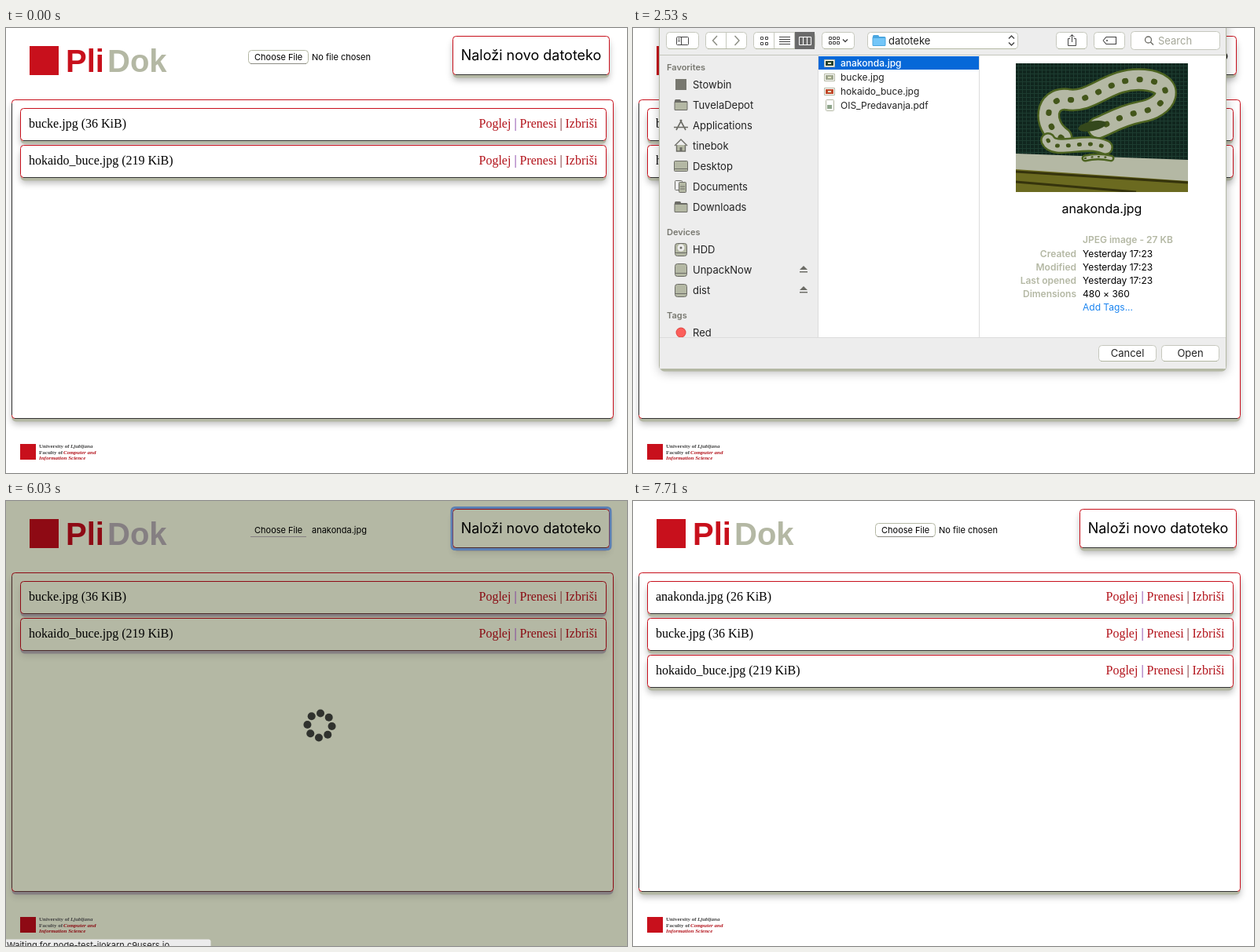
Animation, 790 px wide and 567 px high, one loop 8000 ms. Source, as an HTML page with a canvas:

```html
<!DOCTYPE html>
<html lang="sl">
<head>
<meta charset="utf-8">
<title>PliDok</title>
<style>
html, body { margin: 0; width: 100%; height: 100%; overflow: hidden; background: #fff; }
canvas { display: block; width: 790px; height: 567px; }
</style>
</head>
<body>
<canvas id="stage" width="790" height="567"></canvas>
<script>
const ctx = document.getElementById('stage').getContext('2d');
const LOOP = 8000, TICK = 70, SHEET_TRAVEL = 443;
const UI = 'Inter, sans-serif', SERIF = '"Liberation Serif", serif';
const SAGE = '#b4b8a4', INK = '#222';
const LIGHT = { bg: '#fff', red: '#c8101c', link: '#b3141c', soft: SAGE, edge: '#333', glow: 'rgba(0,0,0,.28)' };
const DIM = { bg: SAGE, red: '#8e0a14', link: '#8a0d14', soft: '#857f82', edge: '#4a2a2a', glow: 'rgba(0,0,0,.12)' };

const ease = p => p * p * (3 - 2 * p);

function text(s, x, y, size, color, { family = UI, style = '400', align = 'left' } = {}) {
  ctx.font = `${style} ${size}px ${family}`;
  ctx.fillStyle = color;
  ctx.textAlign = align;
  ctx.fillText(s, x, y);
}

function box(x, y, w, h, r, fill, stroke) {
  ctx.beginPath();
  ctx.roundRect(x + .5, y + .5, w - 1, h - 1, r);
  if (fill) { ctx.fillStyle = fill; ctx.fill(); }
  if (stroke) { ctx.strokeStyle = stroke; ctx.lineWidth = 1; ctx.stroke(); }
}

function rect(x, y, w, h, color) {
  ctx.fillStyle = color;
  ctx.fillRect(x, y, w, h);
}

function lines(color, width, ...paths) {
  ctx.strokeStyle = color;
  ctx.lineWidth = width;
  ctx.beginPath();
  for (const [x, y, ...rest] of paths) {
    ctx.moveTo(x, y);
    for (let i = 0; i < rest.length; i += 2) ctx.lineTo(rest[i], rest[i + 1]);
  }
  ctx.stroke();
}

function disc(x, y, r, fill) {
  ctx.beginPath();
  ctx.arc(x, y, r, 0, 7);
  ctx.fillStyle = fill;
  ctx.fill();
}

function clipped(x, y, w, h, draw) {
  ctx.save();
  ctx.beginPath();
  ctx.rect(x, y, w, h);
  ctx.clip();
  draw();
  ctx.restore();
}

// ---------- Web page ----------

function card(x, y, w, h, c) {
  ctx.save();
  ctx.shadowColor = c.glow;
  ctx.shadowBlur = 8;
  ctx.shadowOffsetY = 3;
  box(x, y + 4, w, h, 5, c.soft);
  ctx.restore();
  box(x, y, w, h, 4, c.bg, c.red);
  lines(c.edge, 1, [x + 4, y + h - .5, x + w - 4, y + h - .5]);
}

function fileCard(y, label, c) {
  card(18, y, 746, 42, c);
  const serif = { family: SERIF };
  text(label, 29, y + 25, 16, '#000', serif);
  text('Poglej', 601.5, y + 25, 16, c.link, serif);
  text('|', 646.5, y + 25, 16, '#7a2a9c', serif);
  text('Prenesi', 653.5, y + 25, 16, c.link, serif);
  text('|', 704.5, y + 25, 16, '#6a1016', serif);
  text('Izbriši', 711.5, y + 25, 16, c.link, serif);
}

function fileInput(label, pressed, dim) {
  if (dim) {
    lines('#857f82', 1, [311, 45.5, 382, 45.5]);
  } else {
    box(308, 28, 77, 18, 4, pressed ? '#d9d9d9' : '#fff', SAGE);
    lines('#8c8c84', 1, [311, 45.5, 382, 45.5]);
  }
  text('Choose File', 316, 41, 11, '#000');
  text(label, 389, 41, 11, '#000');
}

function footer(c) {
  rect(18, 530, 20, 20, c.red);
  const small = (s, x, y, color, style) => text(s, x, y, 7, color, { family: SERIF, style });
  small('University of', 42, 535, '#444', 'bold');
  small('Ljubljana', 82, 535, '#444', 'italic bold');
  small('Faculty of', 42, 542.5, '#444', 'bold');
  small('Computer and', 73, 542.5, c.link, 'italic bold');
  small('Information Science', 42, 549.5, c.link, 'italic bold');
}

function page(t) {
  const dim = t >= 6030 && t < 7500;
  const done = t >= 7500;
  const c = dim ? DIM : LIGHT;
  rect(0, 0, 790, 567, c.bg);

  rect(30, 23, 37, 37, c.red);
  const brand = { family: '"Liberation Sans", sans-serif', style: 'bold' };
  text('Pli', 76, 56, 40, c.red, brand);
  text('Dok', 129, 56, 40, c.soft, brand);

  fileInput(t >= 4770 && !done ? 'anakonda.jpg' : 'No file chosen', t >= 500 && t < 1200, dim);

  card(568, 10, 200, 50, c);
  if (t >= 5960 && !done) {
    ctx.beginPath();
    ctx.roundRect(567, 8.5, 202, 53, 4);
    ctx.strokeStyle = '#5b7fb4';
    ctx.lineWidth = 3;
    ctx.stroke();
  }
  text('Naloži novo datoteko', 668, 41, 18, '#000', { align: 'center' });

  card(7, 91, 766, 407, c);
  lines(c.edge, 1, [7.5, 96, 7.5, 493]);
  const files = ['bucke.jpg (36 KiB)', 'hokaido_buce.jpg (219 KiB)'];
  if (done) files.unshift('anakonda.jpg (26 KiB)');
  files.forEach((f, i) => fileCard(102 + 47 * i, f, c));
  footer(c);

  if (dim) spinner(t);
  if (t >= 6030 && t < 7710) {
    ctx.globalAlpha = t >= 7640 ? .5 : 1;
    box(-5, 558, 266, 20, 3, '#ececec');
    text('Waiting for node-test-jlokarn.c9users.io...', 1, 570, 11, INK);
    ctx.globalAlpha = 1;
  }
}

function spinner(t) {
  const turn = Math.floor((t - 7010) / TICK) * TICK / 1000 * 2 * Math.PI - .06;
  for (let i = 0; i < 8; i++) {
    const a = turn + (i - 2) * Math.PI / 4;
    disc(399 + 15.6 * Math.cos(a), 286 + 15.6 * Math.sin(a), 5, '#30322e');
  }
}

// ---------- File dialog ----------

const LINE = '#6c6c66';

function folder(x, y, fill, edge) {
  ctx.beginPath();
  ctx.roundRect(x - 8, y - 7, 8, 5, 1.5);
  ctx.roundRect(x - 8.5, y - 5, 17, 12, 1.5);
  ctx.fillStyle = edge;
  ctx.fill();
  rect(x - 7.5, y - 3, 15, 9, fill);
}

const icons = {
  folder: (x, y) => folder(x, y, SAGE, LINE),
  badge: (x, y) => rect(x - 7, y - 7, 14, 14, '#77776f'),
  apps: (x, y) => lines(LINE, 1.6, [x - 6, y + 6, x + 1, y - 7], [x - 1, y - 7, x + 6, y + 6],
    [x - 9, y + 2.5, x + 9, y + 2.5]),
  home(x, y) {
    rect(x - 5.5, y - 1, 11, 8, SAGE);
    lines(LINE, 1.4, [x - 8, y, x, y - 8, x + 8, y], [x - 5.5, y - 1, x - 5.5, y + 7, x + 5.5, y + 7, x + 5.5, y - 1]);
    rect(x - 1.5, y + 2, 3, 5, LINE);
  },
  desktop(x, y) {
    box(x - 9, y - 7, 18, 14, 1, SAGE, LINE);
    rect(x - 8, y + 3, 16, 1, LINE);
  },
  docs(x, y) {
    box(x - 8, y - 8, 10, 13, 1, '#eee', LINE);
    box(x - 3, y - 6, 10, 14, 1, SAGE, LINE);
    lines(LINE, 1, [x - 1, y, x + 5, y], [x - 1, y + 3, x + 5, y + 3]);
  },
  drive(x, y) {
    box(x - 8, y - 8, 16, 17, 3, SAGE, LINE);
    lines(LINE, 1, [x - 8, y + 4.5, x + 8, y + 4.5]);
  },
  disk(x, y) {
    icons.drive(x, y);
    disc(x, y - 2, 4.5, '#eee');
    disc(x, y - 2, 1.5, LINE);
  },
  tag: (x, y) => { disc(x, y, 6.5, '#e04a46'); disc(x, y, 5.5, '#fc5f5b'); },
  note(x, y) {
    lines(LINE, 1.5, [x - 3, y + 5, x - 3, y - 6, x + 5, y - 7, x + 5, y + 4]);
    disc(x - 5, y + 5, 2.5, LINE);
    disc(x + 3, y + 4, 2.5, LINE);
  },
  camera(x, y) {
    box(x - 9, y - 5, 18, 12, 2, SAGE, LINE);
    rect(x - 4, y - 7, 8, 3, LINE);
    disc(x, y + 1, 4.5, LINE);
    disc(x, y + 1, 3, '#ddd');
    disc(x, y + 1, 1.5, LINE);
  },
  film(x, y) {
    box(x - 8, y - 8, 16, 17, 1, '#ddd', LINE);
    lines(LINE, 1, [x - 4.5, y - 8, x - 4.5, y + 8], [x + 4.5, y - 8, x + 4.5, y + 8], [x - 4, y + .5, x + 4, y + .5]);
    for (let i = -6; i < 8; i += 4) { rect(x - 7, y + i, 2, 2, LINE); rect(x + 5, y + i, 2, 2, LINE); }
  },
};

function place(icon, label, y) {
  icons[icon](61, y);
  text(label, 76, y + 4.5, 13, INK);
}

function placeGroup(title, y, items) {
  text(title, 43, y + 4, 11, '#77776f', { style: '600' });
  items.forEach(([icon, label], i) => place(icon, label, y + 22 + 26 * i));
}

function sidebar(t) {
  if (t < 1410) {
    [['note', 'Music'], ['camera', 'Photos'], ['film', 'Movies']].forEach(([icon, label], i) => place(icon, label, 34 + 26 * i));
    return;
  }
  placeGroup('Favorites', 50, [
    [t < 1760 ? 'folder' : 'badge', 'Stowbin'], ['folder', 'TuvelaDepot'], ['apps', 'Applications'],
    ['home', 'tinebok'], ['desktop', 'Desktop'], ['docs', 'Documents'], ['folder', 'Downloads']]);
  placeGroup('Devices', 260, [['disk', 'HDD'], ['drive', 'UnpackNow'], ['drive', 'dist']]);
  placeGroup('Tags', 366, [['tag', 'Red']]);
  for (const y of [308, 334]) {
    ctx.beginPath();
    ctx.moveTo(212, y);
    ctx.lineTo(217, y - 5);
    ctx.lineTo(222, y);
    ctx.fillStyle = LINE;
    ctx.fill();
    rect(212, y + 2, 10, 1.5, LINE);
  }
}

function toolbar(active, picked) {
  const ink = active ? '#444' : '#a4a698', pale = '#a4a698', edge = active ? '#c6c8be' : '#dcdcd8';
  const fill = active ? '#fff' : '#f8f8f8';
  const button = (x, w) => {
    box(x, 5, w, 22, 4, fill, edge);
    if (active) lines(SAGE, 1, [x + 3, 26.5, x + w - 3, 26.5]);
  };
  const grid = (x, y, n, size, step) => {
    for (let r = 0; r < 2; r++)
      for (let i = 0; i < n; i++) box(x + i * step, y + r * (step + 1), size, size, 0, null, ink);
  };

  button(42, 42);
  box(55, 11, 16, 11, 1, null, ink);
  lines(ink, 1, [61.5, 11, 61.5, 21], [57, 14, 60, 14], [57, 16.5, 60, 16.5]);

  button(92, 53);
  lines(edge, 1, [118.5, 6, 118.5, 26]);
  lines(active ? '#8a8c82' : pale, 1.4, [107, 10, 101.5, 16, 107, 22]);
  lines(active ? '#8a8c82' : pale, 1.4, [129.5, 10, 135, 16, 129.5, 22]);

  button(153, 79);
  rect(206, 5, 25, 22, active ? '#6a6a6a' : '#dfe0dc');
  lines(edge, 1, [179.5, 6, 179.5, 26], [205.5, 6, 205.5, 26]);
  grid(162, 11, 2, 4, 6);
  lines(ink, 1, ...[11.5, 14.5, 17.5, 20.5].map(y => [186, y, 200, y]));
  const seg = active ? '#fff' : pale;
  box(211, 11, 16, 11, 0, null, seg);
  lines(seg, 1, [216.5, 11, 216.5, 21], [221.5, 11, 221.5, 21]);

  button(240, 42);
  grid(249, 11, 3, 4, 5);
  lines(ink, 1.4, [267, 14.5, 270, 17.5, 273, 14.5]);

  button(298, 192);
  folder(313, 16, '#74c6f8', '#4aa6e0');
  text('datoteke', 325, 21, 13, active ? INK : '#8e9084');
  lines(ink, 1.4, [478, 13.5, 481.5, 10, 485, 13.5], [478, 18.5, 481.5, 22, 485, 18.5]);

  const act = picked ? ink : pale;
  button(538, 40);
  lines(act, 1, [556, 13.5, 553.5, 13.5, 553.5, 22.5, 563.5, 22.5, 563.5, 13.5, 561, 13.5],
    [558.5, 18, 558.5, 8.5], [555.5, 11.5, 558.5, 8.5, 561.5, 11.5]);
  button(586, 40);
  lines(act, 1.1, [598, 16, 602, 11.5, 614.5, 11.5, 614.5, 20.5, 602, 20.5, 598, 16]);
  disc(603, 16, 1, act);

  box(633, 4, 114, 24, 4, fill, edge);
  ctx.beginPath();
  ctx.arc(655.5, 15, 4, 0, 7);
  ctx.strokeStyle = active ? LINE : pale;
  ctx.lineWidth = 1.3;
  ctx.stroke();
  lines(active ? LINE : pale, 1.4, [658.5, 18, 662, 21.5]);
  text('Search', 668, 21, 13, pale);
}

function fileList(t) {
  const selected = t >= 2390;
  if (selected) rect(236, 36, 204, 17, '#0668d8');
  const files = [['anakonda.jpg', '#23402c'], ['bucke.jpg', '#9fa68e'], ['hokaido_buce.jpg', '#c0492a'], ['OIS_Predavanja.pdf', '#8fa68c']];
  files.forEach(([name, tone], i) => {
    const y = 45 + 18 * i, white = selected && i === 0;
    if (i < 3) {
      box(243, y - 5, 14, 10, 0, '#fff', SAGE);
      rect(245, y - 3, 10, 6, tone);
      rect(248, y - 1, 4, 2, '#e3e6c8');
    } else {
      box(245, y - 8, 11, 15, 1, '#fff', SAGE);
      rect(247, y - 1, 6, 5, tone);
    }
    text(name, 264, y + 4, 12, white ? '#fff' : INK, { style: white ? '500' : '400' });
  });
}

function photo() {
  clipped(487, 45, 219, 164, () => {
    rect(487, 45, 219, 164, '#10261e');
    for (let x = 490; x < 706; x += 5) rect(x, 45, 1, 122, '#1d3c30');
    for (let y = 48; y < 166; y += 5) rect(487, y, 219, 1, '#1d3c30');
    ctx.fillStyle = SAGE;
    ctx.beginPath();
    ctx.moveTo(487, 160); ctx.lineTo(706, 168); ctx.lineTo(706, 209); ctx.lineTo(487, 209);
    ctx.fill();
    ctx.fillStyle = '#6b6a20';
    ctx.beginPath();
    ctx.moveTo(487, 180); ctx.lineTo(706, 195); ctx.lineTo(706, 209); ctx.lineTo(487, 209);
    ctx.fill();
    lines('#35330c', 3, [487, 183, 706, 197], [487, 196, 640, 209]);

    const body = new Path2D('M545 140C520 122 525 88 552 91C585 97 605 62 650 66C694 70 680 102 645 107C620 112 605 122 592 127');
    const coil = new Path2D('M528 143C536 160 575 140 601 152');
    const tail = new Path2D('M575 166Q592 162 608 166');
    ctx.lineCap = 'round';
    for (const [path, width] of [[body, 29], [coil, 20], [tail, 9]]) {
      ctx.strokeStyle = '#4c6320';
      ctx.lineWidth = width;
      ctx.stroke(path);
      ctx.strokeStyle = SAGE;
      ctx.lineWidth = width - 5;
      ctx.stroke(path);
      ctx.strokeStyle = '#43561a';
      ctx.lineWidth = width / 4;
      ctx.setLineDash([1, width / 2 + 3]);
      ctx.stroke(path);
      ctx.setLineDash([]);
    }
    ctx.lineCap = 'butt';
    ctx.fillStyle = '#34481c';
    ctx.beginPath();
    ctx.ellipse(584, 125, 18, 6, -.2, 0, 7);
    ctx.fill();
  });
}

function preview(t) {
  if (t >= 2530) photo();
  text('anakonda.jpg', 596.5, 236, 16, '#000', { align: 'center' });
  text('JPEG image - 27 KB', 572, 274, 12, SAGE, { style: '600' });
  [['Created', 'Yesterday 17:23'], ['Modified', 'Yesterday 17:23'], ['Last opened', 'Yesterday 17:23'], ['Dimensions', '480 × 360']]
    .forEach(([key, value], i) => {
      text(key, 564, 292 + 17 * i, 12, SAGE, { style: '600', align: 'right' });
      text(value, 572, 292 + 17 * i, 12, '#000');
    });
  text('Add Tags...', 572, 360, 12, '#1a84f0');
}

function dialogButton(x, label, active, enabled, pressed) {
  box(x, 404, 74, 21, 4, pressed ? '#dcdedc' : active ? '#fff' : '#f6f6f6', active ? '#c6c8be' : '#dcdcd8');
  if (active) lines(SAGE, 1, [x + 3, 424.5, x + 71, 424.5]);
  text(label, x + 37, 419, 13, enabled ? INK : '#a4a698', { align: 'center', style: active ? '400' : '500' });
}

function dialog(t) {
  const active = t >= 1340, picked = t >= 2530;
  ctx.save();
  ctx.shadowColor = 'rgba(0,0,0,.3)';
  ctx.shadowBlur = 14;
  ctx.shadowOffsetY = 1;
  box(34, -20, 721, 458, 5, SAGE);
  ctx.restore();
  box(33, -20, 722, 455, 3, active ? '#ededed' : '#f4f4f4', SAGE);
  rect(236, 35, 518, 359, '#fff');
  rect(34, 394, 720, 40, '#ededed');
  clipped(34, 35, 201, 359, () => sidebar(t));
  lines('#dcdcdc', 1, [235.5, 35, 235.5, 394], [440.5, 35, 440.5, 394], [34, 394.5, 754, 394.5]);
  lines('#c4c6bc', 1, [34, 34.5, 754, 34.5]);
  toolbar(active, picked);
  if (t >= 1410) fileList(t);
  if (t >= 2460) preview(t);
  dialogButton(592, 'Cancel', active, active, false);
  dialogButton(672, 'Open', active, picked, t >= 4140);
}

function sheetOffset(t) {
  if (t < 850 || t >= 4630) return null;
  const steps = from => Math.floor((t - from) / TICK) + 1;
  if (t < 1130) return -SHEET_TRAVEL * (1 - ease(steps(850) / 5));
  if (t >= 4280) return -SHEET_TRAVEL * ease(steps(4280) / 6);
  return 0;
}

function frame(now) {
  const t = now % LOOP;
  page(t);
  const y = sheetOffset(t);
  if (y !== null) {
    ctx.save();
    ctx.translate(0, Math.round(y));
    dialog(t);
    ctx.restore();
  }
  requestAnimationFrame(frame);
}

let start;
requestAnimationFrame(now => {
  start = now;
  const run = time => frame(time);
  run(now);
});
</script>
</body>
</html>
```
